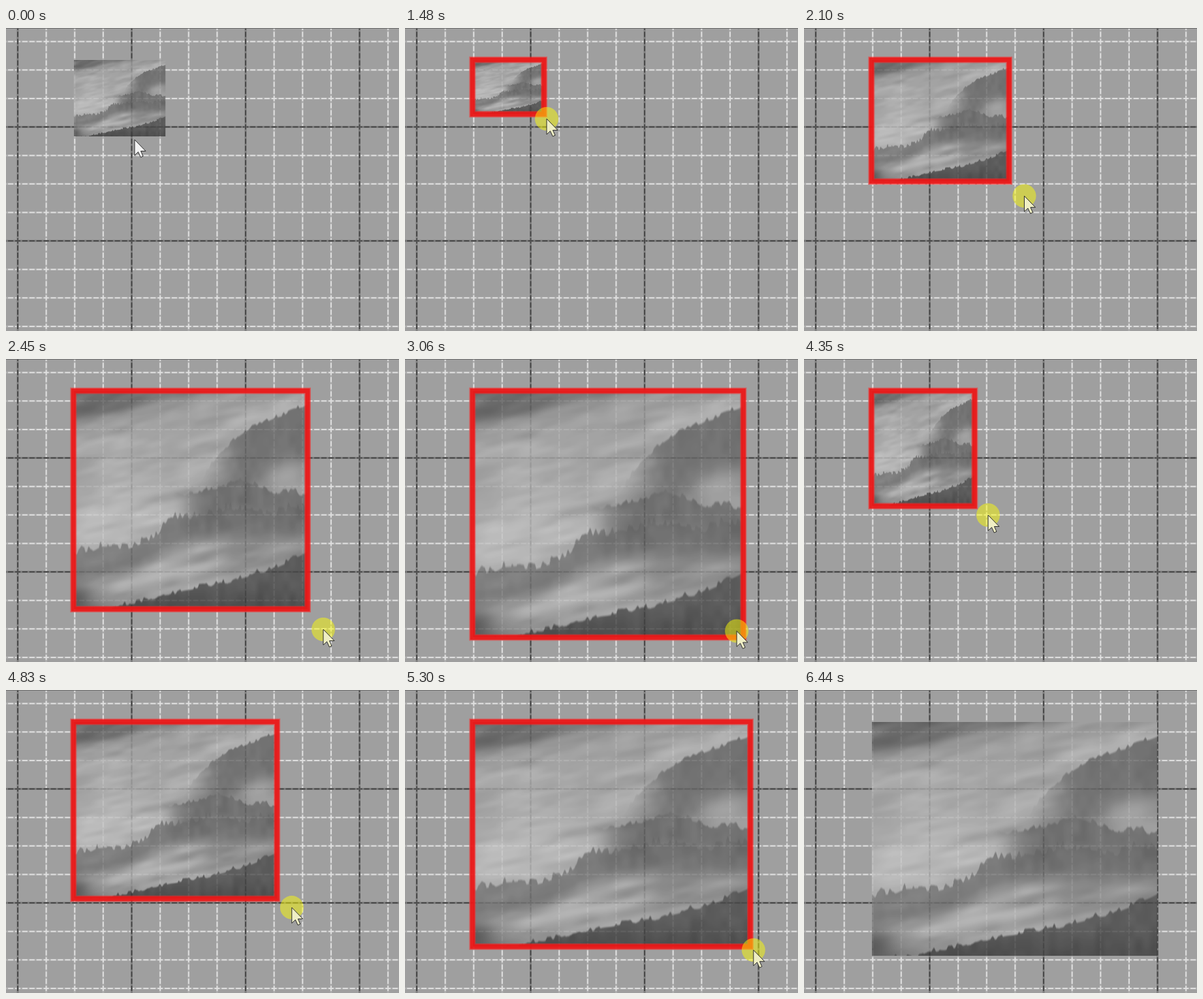
Recreate the animation shown at these times as an HTML page with a canvas. Size 602 by 464 pixels, loop 7370 ms.

```html
<!DOCTYPE html>
<html lang="en">
<head>
<meta charset="utf-8">
<title>Resizing a picture</title>
<style>
  html, body { margin: 0; width: 100%; height: 100%; overflow: hidden; background: #9f9f9f; }
  svg, canvas { position: absolute; left: 0; top: 0; }
  canvas { transform-origin: 0 0; opacity: .8; }
</style>
</head>
<body>
<svg id="grid" width="602" height="464"></svg>
<canvas id="picture" width="437" height="357"></canvas>
<svg width="602" height="464">
  <g id="border" fill="none">
    <rect stroke="#ff2424" stroke-width="10" stroke-opacity=".5"/>
    <rect stroke="#ec1616" stroke-width="7" stroke-opacity=".88"/>
  </g>
  <g id="pointer">
    <circle id="press" r="18" fill="#ff0" fill-opacity=".48"/>
    <path id="arrow" d="M0 0V24L5.5 18.8L9.3 27L13 25.3L9.5 17.5H17Z" stroke="#2a2a2a"/>
  </g>
</svg>
<script>
const LOOP = 7370, DRAG_START = 1070, STEP = 69.4;
const LEFT = 104, TOP = 49, WIDTH = 437, HEIGHT = 357;
const $ = id => document.getElementById(id);
const mix = (a, b, k) => a + (b - a) * k;
const ease = k => k * k * (3 - 2 * k);
const smooth = (from, to, v) => ease(Math.min(1, Math.max(0, (v - from) / (to - from))));
const bell = (...offsets) => Math.exp(-offsets.reduce((sum, v) => sum + v * v, 0));

function drawGrid() {
  const cell = 43.63, left = 18, top = 20.7, dash = 8;
  const line = (d, stroke, width, dashes = 'none') => {
    const path = document.createElementNS('http://www.w3.org/2000/svg', 'path');
    const attrs = { d, stroke, 'stroke-width': width, 'stroke-dasharray': dashes };
    for (const name in attrs) path.setAttribute(name, attrs[name]);
    $('grid').appendChild(path);
  };
  const ruled = (d, major, solid) => {
    line(d, major ? solid : 'rgba(255,255,255,.14)', 3);
    line(d, major ? '#484848' : '#dedede', 2, `${dash} ${cell / 4 - dash}`);
  };
  // Dashes are centred on the crossings; every fourth line is dark.
  for (const major of [false, true])
    for (let i = 0; i < 14; i++) {
      const x = left + i * cell, y = top + i * cell;
      if ((i % 4 === 0) === major) ruled(`M${x} ${top - cell - dash / 2}V464`, major, '#808080');
      if ((i % 4 === 3) === major) ruled(`M${left - cell - dash / 2} ${y}H602`, major, '#7a7a7a');
    }
  line('M0 .5H602', '#6c6c6c', 1);
}

function hash(x, y) {
  const v = Math.sin(x * 127.1 + y * 311.7) * 43758.5453;
  return v - Math.floor(v);
}

function noise(x, y) {
  const i = Math.floor(x), j = Math.floor(y), u = ease(x - i), v = ease(y - j);
  return mix(mix(hash(i, j), hash(i + 1, j), u), mix(hash(i, j + 1), hash(i + 1, j + 1), u), v);
}

// Misty ridges from back to front; d is the distance from the right edge.
const ridges = [
  { top: d => 22 + .33 * d + 62 * (d / 200) ** 4, shade: d => .92 * smooth(210, 100, d), tone: 97, depth: 165, trees: 9 },
  { top: d => 168 - 23 * bell((d - 125) / 45), shade: d => .85 * smooth(255, 190, d), tone: 97, depth: 75, trees: 12 },
  { top: d => 197 + 68 / (1 + Math.exp((282 - d) / 35)), shade: d => mix(.85, .65, d / WIDTH), tone: 93, depth: 60, trees: 20 },
  { top: d => 264 + 86 * (d / 332) ** .75, shade: () => .95, tone: 72, depth: 400, trees: 11 }
];

function mist(x, y) {
  const across = y + .2 * x, edge = 50 - .19 * x;
  const streaks = noise(x / 80, across / 16) + .5 * noise(x / 30 + 9, across / 9) - .75;
  return 164 + 28 * bell((x - 60) / 120, (y - 200) / 75) + 34 * streaks
    - 66 * smooth(edge + 16, edge - 16, y)
    - 26 * smooth(180, 270, y) * smooth(180, WIDTH, x);
}

function drawPicture() {
  const context = $('picture').getContext('2d');
  const image = context.createImageData(WIDTH, HEIGHT);
  for (let x = 0; x < WIDTH; x++) {
    const d = WIDTH - x;
    const layers = ridges.map(({ top, shade, trees, ...rest }, i) => ({
      ...rest, base: top(d), shade: shade(d),
      crest: top(d) - trees * (Math.max(0, noise(x / 4.5, i * 7) - .4) + .7 * noise(x / 17, i * 5) - .3)
    }));
    for (let y = 0; y < HEIGHT; y++) {
      let tone = mist(x, y);
      layers.forEach(({ base, crest, shade, tone: dark, depth }, i) => {
        const cover = smooth(crest - 2, crest + 3, y) * (1 - smooth(base + depth * .4, base + depth, y));
        tone = mix(tone, dark + 16 * (noise(x / 12, y / 20) - .5), shade * cover);
        if (i === 0) tone = mix(tone, 168, .9 * bell((x - 395) / 42, (y - 140 + .15 * (x - 395)) / 27));
      });
      tone = mix(tone, 76, .85 * bell(x / 42, (y - 345) / 42)) - 16 * smooth(310, HEIGHT, y);
      const at = (y * WIDTH + x) * 4;
      image.data.fill(tone, at, at + 3);
      image.data[at + 3] = 255;
    }
  }
  context.putImageData(image, 0, 0);
}

// Pointer path: screen update counted from the start of the drag, x, y
const path = [
  [-16, 197, 171], [-8, 233, 168], [0, 233, 168], [2.3, 553, 160], [5, 213, 132], [6, 217, 139],
  [10, 258, 181], [19, 462, 383], [20, 486, 414], [26, 522, 430], [33, 406, 318], [34, 372, 286],
  [42, 195, 180], [47, 282, 239], [60, 529, 393], [64, 541, 407], [70, 541, 407], [77, 552, 480]
];

const slope = (i, axis) => (path[i + 1][axis] - path[i][axis]) / (path[i + 1][0] - path[i][0]);

function tangent(i, axis) {
  if (i === 0 || i === path.length - 1) return 0;
  const a = slope(i - 1, axis), b = slope(i, axis);
  return a * b > 0 ? 2 * a * b / (a + b) : 0;
}

// Monotone cubic through the path points
function pointerAt(step) {
  const last = path.length - 1, s = Math.min(step, path[last][0]);
  let i = 0;
  while (i < last - 1 && s >= path[i + 1][0]) i++;
  const span = path[i + 1][0] - path[i][0], u = (s - path[i][0]) / span;
  return [1, 2].map(axis => mix(path[i][axis], path[i + 1][axis], ease(u))
    + span * u * (1 - u) * ((1 - u) * tangent(i, axis) - u * tangent(i + 1, axis)));
}

function render(time) {
  const step = Math.floor((time - DRAG_START) / STEP + .12);
  const [x, y] = pointerAt(step);
  // The corner trails the pointer by one update.
  const [right, bottom] = step < 1 ? [244.5, 166] : pointerAt(Math.min(step - 1, 64));
  const w = right - LEFT, h = bottom - TOP;
  const pressed = step >= 0 && step < 70, outlined = step > -14 && step < 72;

  $('picture').style.transform = `translate(${LEFT}px, ${TOP}px) scale(${w / WIDTH}, ${h / HEIGHT})`;
  for (const rect of $('border').children) {
    const box = { x: LEFT - .7, y: TOP - .3, width: w + .7, height: h + .3 };
    for (const name in box) rect.setAttribute(name, box[name]);
  }
  $('border').setAttribute('visibility', outlined ? 'visible' : 'hidden');
  $('press').setAttribute('visibility', pressed ? 'visible' : 'hidden');
  $('arrow').setAttribute('fill', pressed ? '#efeec4' : '#f2f2f2');
  $('pointer').setAttribute('transform', `translate(${x} ${y})`);
}

drawGrid();
drawPicture();
const begin = performance.now();
function tick() {
  render((performance.now() - begin) % LOOP);
  requestAnimationFrame(tick);
}
tick();
</script>
</body>
</html>
```
